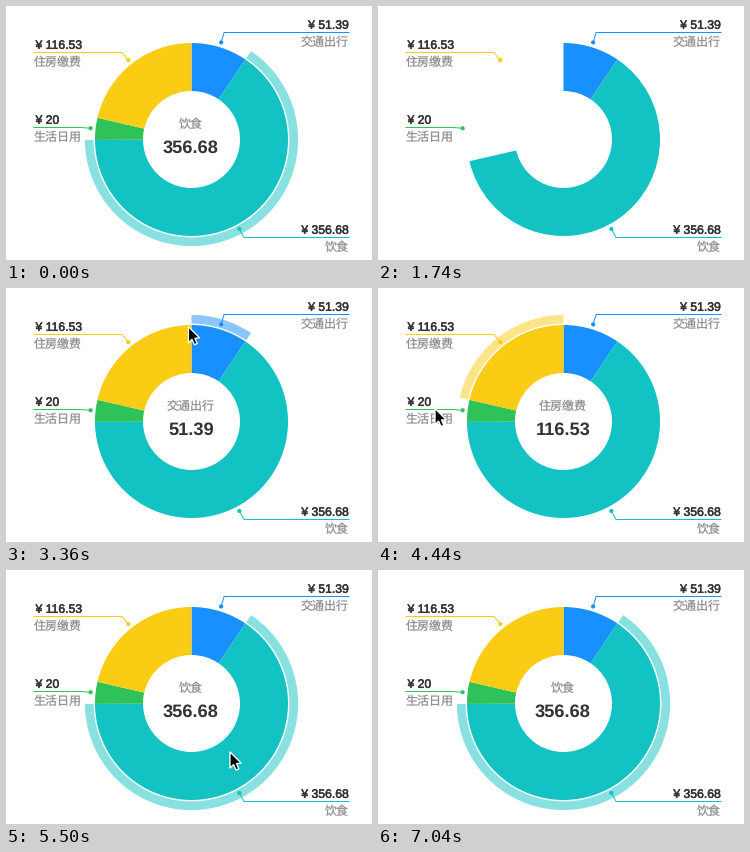
Write a matplotlib script that moves like this. It is 366 px wide and 254 px high and loops after 7430 ms.

```python
import numpy as np
import matplotlib.pyplot as plt
from matplotlib.animation import FuncAnimation
from matplotlib.patches import Circle, Polygon, Wedge
from matplotlib.patheffects import withStroke

W, H, DPI = 366, 254, 64
LOOP, TICK = 7430, 10
PT = 72 / DPI  # points per pixel

CX, CY, R_OUT, R_IN = 185.5, 133.5, 96.5, 48.5
GREY, DARK = "#929292", "#333333"
ITEMS = [
    ("交通出行", "51.39", "#1890ff"),
    ("饮食", "356.68", "#13c2c2"),
    ("生活日用", "20", "#2fc25b"),
    ("住房缴费", "116.53", "#facc14"),
]
TRAFFIC, FOOD, DAILY, HOUSING = range(4)

values = np.array([float(amount) for _, amount, _ in ITEMS])
ends = np.cumsum(values) / values.sum() * 360
starts = np.concatenate(([0], ends[:-1]))

SWEEP_START, SWEEP_SHOWN, SWEEP_END = 1530, 1550, 1960

# Pointer: departure, arrival, stop, item clicked there
ENTRY = (350, 87)
MOVES = [
    (2410, 2500, (278, -25), None),
    (2670, 2800, (325, 21), None),
    (2940, 2950, (331, 21), TRAFFIC),
    (3240, 3450, (71, 52), None),
    (3650, 3810, (44, 46), HOUSING),
    (4110, 4440, (57, 120.5), DAILY),
    (4850, 5230, (224, 182), FOOD),
    (5500, 5850, (163, 57), HOUSING),
    (6120, 6290, (310, 236), None),
    (6470, 6630, (314, 229), FOOD),
    (6930, 7040, (331, 258), None),
]
CLICK_DELAY, STEP = 120, 30
ARROW = np.array([(0, 0), (0, 16), (3.6, 12.6), (6, 18), (8.8, 16.8),
                  (6.5, 11.5), (11.2, 11.2)])

plt.rcParams["text.hinting"] = "none"
fig = plt.figure(figsize=(W / DPI, H / DPI), dpi=DPI, facecolor="white")
ax = fig.add_axes([0, 0, 1, 1])
ax.set_xlim(0, W)
ax.set_ylim(H, 0)
ax.axis("off")


def polar(deg, radius):
    """Point at a clockwise angle from twelve o'clock."""
    a = np.radians(deg)
    return CX + radius * np.sin(a), CY - radius * np.cos(a)


def rings(r0, r1, **kw):
    return [ax.add_patch(Wedge((CX, CY), r1, a - 90, b - 90, width=r1 - r0,
                               fc=color, ec="none", lw=0, **kw))
            for a, b, (_, _, color) in zip(starts, ends, ITEMS)]


def write(x, y, s, size, color, family="Noto Sans CJK JP", **kw):
    return ax.text(x, y, s, fontsize=size * PT, color=color, family=family,
                   va="baseline", zorder=5, **kw)


def add_label(i):
    name, amount, color = ITEMS[i]
    mid = (starts[i] + ends[i]) / 2
    dot, (bend, y) = polar(mid, R_OUT + 5), polar(mid, R_OUT + 15)
    y = np.floor(y) + 0.5
    edge, ha, indent = (343, "right", 0) if mid < 180 else (28, "left", 1.5)
    ax.plot([dot[0], bend, edge], [dot[1], y, y], color=color, lw=PT,
            zorder=4, snap=False)
    ax.add_patch(Circle(dot, 2.1, fc=color, ec="none", zorder=4))
    # A thin stroke gives the digits a medium weight
    write(edge + indent, y - 3.7, "¥ " + amount, 12.2, DARK, "Liberation Sans",
          ha=ha, path_effects=[withStroke(linewidth=0.5 * PT, foreground=DARK)])
    write(edge, y + 13.3, name, 12, GREY, ha=ha)


sectors = rings(R_IN, R_OUT)
halos = rings(R_OUT + 1.4, R_OUT + 10.1, alpha=0.5)
for i in range(len(ITEMS)):
    add_label(i)
title = write(185, 121.5, "", 12, GREY, ha="center")
total = write(185, 146.5, "", 18.2, DARK, "Liberation Sans", ha="center",
              weight="bold")
pointer = ax.add_patch(Polygon(ARROW, closed=True, fc="black", ec="white",
                               lw=1.3 * PT, joinstyle="round", zorder=9))


def progress(t, start, end, step):
    """Share of the way from start to end, advancing in steps."""
    if t >= end:
        return 1
    return max(t - start, 0) // step * step / (end - start)


def sweep_angle(t):
    if t < SWEEP_SHOWN:
        return 360
    u = progress(t, SWEEP_START, SWEEP_END, SWEEP_SHOWN - SWEEP_START)
    return 360 * (1 - (1 - u) ** 2)


def pointer_at(t):
    pos = np.array(ENTRY, float)
    for start, end, stop, _ in MOVES:
        pos += (np.array(stop) - pos) * progress(t, start, end, STEP)
    return pos


def picked_at(t):
    if t < SWEEP_SHOWN:
        return FOOD
    picked = None
    for _, end, _, item in MOVES:
        if item is not None and t >= end + CLICK_DELAY:
            picked = item
    return picked


def draw(n):
    t = n * TICK
    limit = sweep_angle(t)
    for sector, a, b in zip(sectors, starts, ends):
        sector.set_visible(limit > a)
        sector.set_theta2(np.clip(limit, a, b) - 90)

    picked = picked_at(t)
    for i, halo in enumerate(halos):
        halo.set_visible(i == picked)
    name, amount, _ = ("", "", "") if picked is None else ITEMS[picked]
    title.set_text(name)
    total.set_text(amount)

    pointer.set_visible(MOVES[0][0] <= t < MOVES[-1][1])
    pointer.set_xy(ARROW + pointer_at(t))
    return [*sectors, *halos, title, total, pointer]


anim = FuncAnimation(fig, draw, frames=LOOP // TICK, interval=TICK,
                     repeat=True, repeat_delay=0, blit=False)
plt.show()
```
